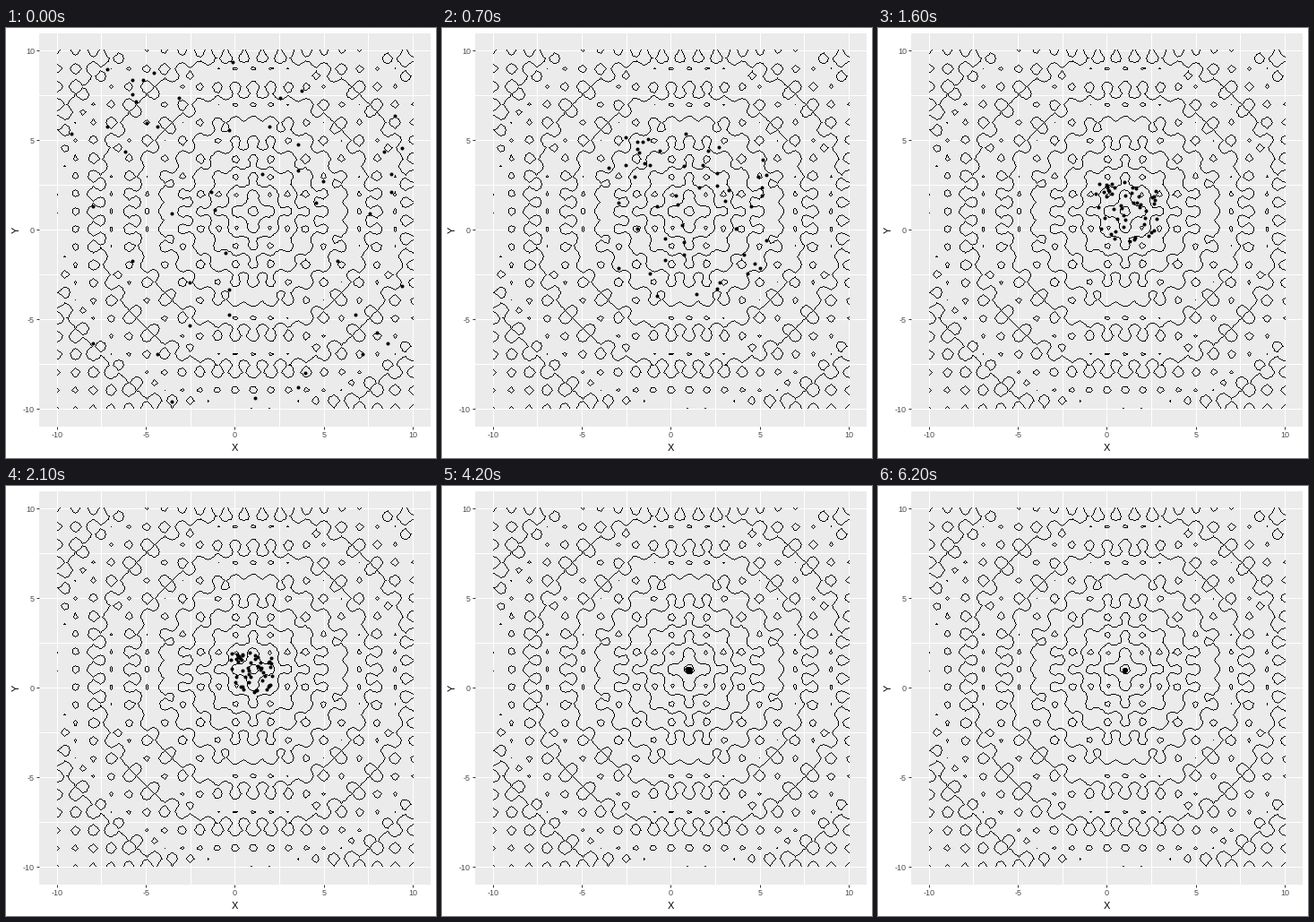
A matplotlib script for the animation above (10 s loop, 480 px wide and 480 px high).

```python
import numpy as np
import matplotlib
import matplotlib.pyplot as plt
from matplotlib.animation import FuncAnimation

SIZE, DPI = 480, 80
PX = 72 / DPI                      # points per pixel
LEFT, RIGHT, TOP, BOTTOM = 36.95, 473.95, 5.5, 445.0
FRAMES, INTERVAL = 100, 100

matplotlib.rcParams["font.family"] = "Liberation Sans"

rng = np.random.default_rng(12)
grid = np.linspace(-10, 10, 100)


def ackley(x, y):
    """Ackley surface with its minimum at (1, 1)."""
    u, v = x - 1, y - 1
    bowl = -20 * np.exp(-0.2 * np.sqrt((u**2 + v**2) / 2))
    waves = -np.exp((np.cos(2 * np.pi * u) + np.cos(2 * np.pi * v)) / 2)
    return bowl + waves + 20 + np.e


# The swarm starts on random grid nodes and shrinks towards the best spot
# known, which itself moves from a near miss to the true minimum.
COUNT, REST = 50, 62
GOAL, MISS = 1.0, 0.7
start = np.column_stack([grid[rng.integers(4, 99, COUNT)],
                         grid[rng.integers(2, 100, COUNT)]])
wobble = rng.normal(0, 0.7, (COUNT, 2))
KEYS = [0, 7, 12, 22, 33, 44, REST]
SPREAD = np.log([1, 0.478, 0.245, 0.11, 0.032, 0.008, 0.002])


def swarm(n):
    n = min(n, REST)
    scale = np.exp(np.interp(n, KEYS, SPREAD))
    learned = np.clip((n - 7) / 14, 0, 1)
    best = GOAL + MISS * (1 - learned)
    return best + (start + wobble * learned - best) * scale


def pixel_lines(paths, transform):
    """Rasterise paths as hard lines one pixel wide, as an RGBA image."""
    image = np.zeros((SIZE, SIZE, 4))
    for path in paths:
        for poly in path.to_polygons(closed_only=False):
            nodes = np.rint(transform.transform(poly)).astype(int)
            for a, b in zip(nodes[:-1], nodes[1:]):
                steps = max(np.abs(b - a).max(), 1)
                x, y = np.rint(np.linspace(a, b, steps + 1)).astype(int).T
                image[SIZE - 1 - y, x, 3] = 1
    return image


fig = plt.figure(figsize=(SIZE / DPI, SIZE / DPI), dpi=DPI, facecolor="white")
ax = fig.add_axes([LEFT / SIZE, 1 - BOTTOM / SIZE,
                   (RIGHT - LEFT) / SIZE, (BOTTOM - TOP) / SIZE],
                  facecolor="#EBEBEB")
ax.set(xlim=(-11, 11), ylim=(-11, 11))
for spine in ax.spines.values():
    spine.set_visible(False)

ticks = np.arange(-10, 11, 5)
for axis in (ax.xaxis, ax.yaxis):
    axis.set_ticks(ticks, [str(t) for t in ticks])
    axis.set_ticks(np.arange(-7.5, 8, 5), minor=True)
ax.set_axisbelow(True)
ax.grid(True, which="both", color="white", linewidth=PX)
ax.tick_params(which="major", length=2.75 * PX, width=PX, color="#333333",
               labelcolor="#4D4D4D", labelsize=9 * PX, pad=2.2 * PX)
ax.tick_params(which="minor", length=0)
fig.text(255 / SIZE, 1 - 469.5 / SIZE, "X", size=11 * PX,
         ha="center", va="center")
fig.text(12 / SIZE, 1 - 225.5 / SIZE, "Y", size=11 * PX, rotation=90,
         ha="center", va="center")

gx, gy = np.meshgrid(grid, grid)
rings = ax.contour(gx, gy, ackley(gx, gy), levels=np.arange(2, 20, 2))
ax.set(xlim=(-11, 11), ylim=(-11, 11))
fig.figimage(pixel_lines(rings.get_paths(), ax.transData), zorder=5)
rings.remove()

dots, = ax.plot([], [], "o", color="black", markersize=4 * PX,
                markeredgewidth=0, antialiased=False)


def update(n):
    dots.set_data(*swarm(n).T)
    return dots,


anim = FuncAnimation(fig, update, frames=FRAMES, interval=INTERVAL,
                     repeat=True, repeat_delay=0)
plt.show()
```
